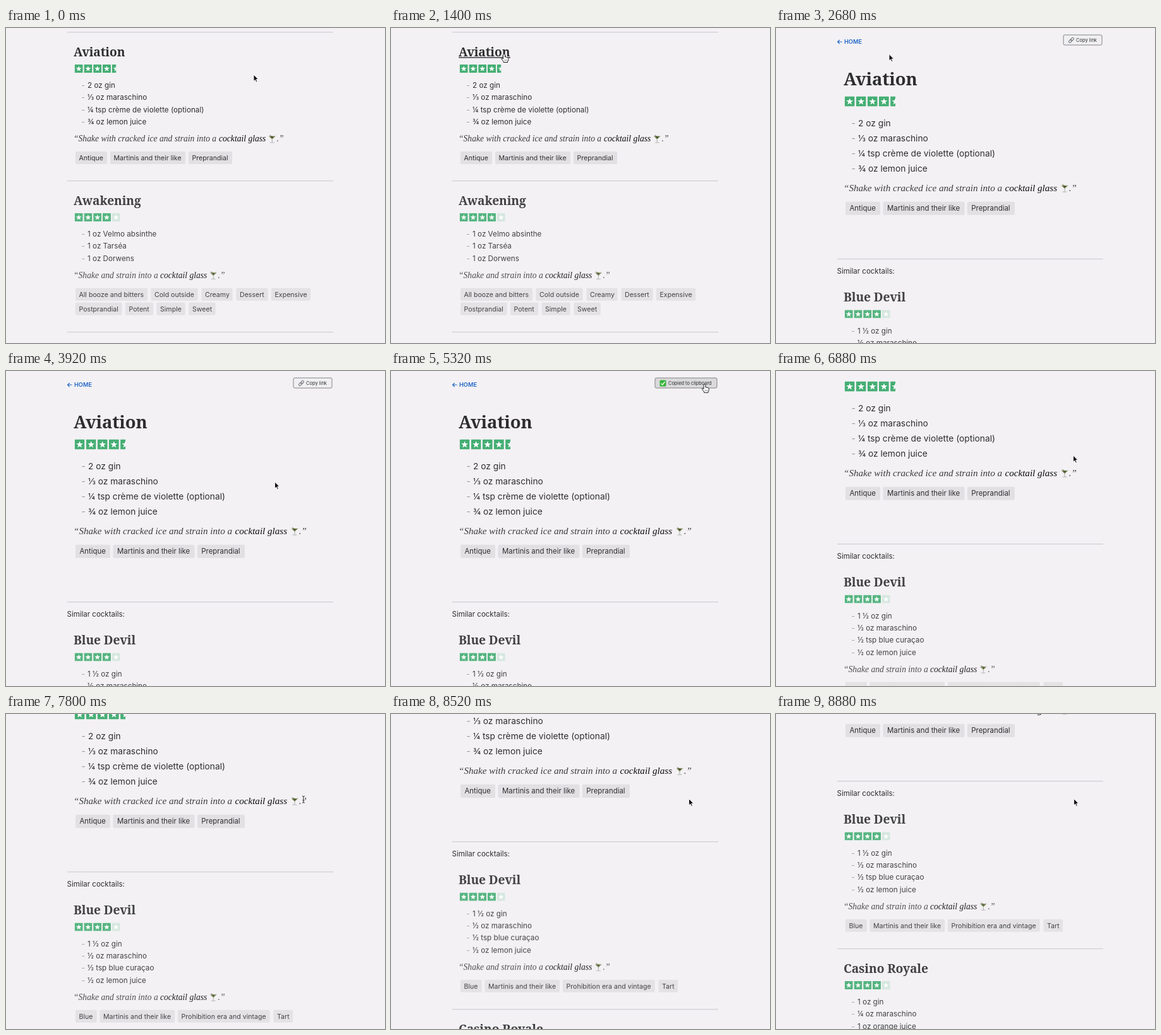
Write an HTML page that moves like this. It is 600 by 500 pixels and loops after 8920 ms.

```html
<!DOCTYPE html>
<html lang="en">
<head>
<meta charset="utf-8">
<title>Cocktail recipes</title>
<style>
  html, body { margin: 0; width: 100%; height: 100%; overflow: hidden; background: #f3f1f4; }
  #stage { display: block; width: 600px; height: 500px; }
  text { font-family: Inter, "Noto Sans", sans-serif; fill: #2e2e30; }
  .title { font-family: "Noto Serif", serif; font-weight: 700; letter-spacing: -.006em; }
  .quote { font-family: "Liberation Serif", serif; font-style: italic; fill: #3c3c3e; }
  .strong { fill: #0c0c0c; }
  .dash { fill: #97979b; }
  .tag { fill: #e2e0e3; }
  .rule { fill: #d0cfd3; }
  .link { fill: #2166c8; font-weight: 600; }
  .secondary { opacity: .9; }
</style>
</head>
<body>
<svg id="stage" viewBox="0 0 600 500">
  <g id="listPage"></g>
  <g id="detailPage"></g>
  <g id="arrow"><path d="M0 0V10.6L2.4 8.3L4 11.9L5.8 11.1L4.2 7.6H7.5Z" fill="#111" stroke="#fff" stroke-width=".9"/></g>
  <g id="hand">
    <path d="M-1.5 1.2Q-1.4-.2 0-.2T1.4 1.2V4.6Q2.6 4 3.4 5Q4.7 4.5 5.2 5.6Q6.8 5.3 6.8 7V9.2Q6.6 10.6 5.6 11.6V13H-.8V11.8Q-2.6 9.8-4.2 7.2Q-4.4 5.8-3 6.2L-1.5 7.5Z" fill="#fff" stroke="#222" stroke-width="1"/>
    <path d="M.7 8.5V11M2.6 8.5V11M4.4 8.5V11" stroke="#555" stroke-width=".6"/>
  </g>
  <g id="ibeam" fill="none">
    <path d="M-2-5.5Q0-5.5 0-4V4Q0 5.5-2 5.5M2-5.5Q0-5.5 0-4M0 4Q0 5.5 2 5.5M-1.3 1.2H1.3" stroke="#fff" stroke-width="2.2"/>
    <path d="M-2-5.5Q0-5.5 0-4V4Q0 5.5-2 5.5M2-5.5Q0-5.5 0-4M0 4Q0 5.5 2 5.5M-1.3 1.2H1.3" stroke="#222"/>
  </g>
</svg>
<script>
const LOOP = 8920, PAGE_CHANGE = 2160, COPIED = 4960;
const $ = id => document.getElementById(id);

const text = (x, y, size, content, cls = "") =>
  `<text x="${x}" y="${y}" font-size="${size}" class="${cls}">${content}</text>`;
const box = (x, y, w, h, attrs) =>
  `<rect x="${x}" y="${y}" width="${w}" height="${h}" ${attrs}/>`;
const rule = y => box(97, y, 421, 1.3, 'class="rule"');

const starPoints = Array.from({ length: 10 }, (_, i) => {
  const r = i % 2 ? 1.9 : 4.7, a = (i / 5 - .5) * Math.PI;
  return `${(6.5 + r * Math.cos(a)).toFixed(2)},${(6.8 + r * Math.sin(a)).toFixed(2)}`;
}).join(" ");

function star(x, y, size, part, color) {
  return `<svg x="${x}" y="${y}" width="${size * part}" height="${size}" viewBox="0 0 ${13 * part} 13">
    <rect width="13" height="13" rx=".6" fill="${color}"/><polygon points="${starPoints}" fill="#fff"/></svg>`;
}

function rating(value, y, size, pitch) {
  let out = "";
  for (let i = 0; i < Math.ceil(value); i++)
    out += star(108.7 + i * pitch, y, size, Math.min(1, value - i), "#45ae74");
  if (value === 4) out += star(108.7 + 4 * pitch, y, size, 1, "#d3e6dd");
  return out;
}

const glass = (x, y) => `<g transform="translate(${x} ${y})">
  <path d="M0-9.5H13L6.5-3.2Z" fill="#d9dad4"/><path d="M1.6-8.6H11.4L6.5-4Z" fill="#6d7642"/>
  <path d="M3-10.3L7-7" stroke="#594a2c"/><circle cx="6.6" cy="-7" r="1.4" fill="#3f5a2b"/>
  <path d="M6.5-4V1" stroke="#a9aaa9"/><path d="M3 1.4H10" stroke="#bcbdbc" stroke-width="1.2"/></g>`;

// Sizes and offsets of a recipe card; "large" is the main card of the detail page.
const small = { title: 19.2, stars: 13, starPitch: 14.75, starsY: 13.4, itemsY: 50.4, pitch: 19.3, item: 11.7, itemX: 129,
  quoteGap: 27.5, quote: 13.6, glassDx: 77.8, endDx: 91.5, tagGap: 29.5, tag: 10.6, tagH: 20, tagPad: 5.6 };
const large = { title: 27.5, stars: 15.8, starPitch: 18.1, starsY: 17.8, itemsY: 64.7, pitch: 24.1, item: 13.75, itemX: 130,
  quoteGap: 31, quote: 15.1, glassDx: 88, endDx: 101.2, tagGap: 31.5, tag: 11.4, tagH: 21.2, tagPad: 6.5 };

function card(recipe, y, s, cls = "") {
  const lastItem = y + s.itemsY + (recipe.items.length - 1) * s.pitch;
  const quoteY = lastItem + s.quoteGap;
  let out = text(107, y, s.title, recipe.name, "title") + rating(recipe.stars, y + s.starsY, s.stars, s.starPitch);
  recipe.items.forEach((item, i) => {
    const itemY = y + s.itemsY + i * s.pitch;
    out += text(119.5, itemY, s.item, "-", "dash") + text(s.itemX, itemY, s.item, item);
  });
  if (recipe.quote) {
    const [opening, strongX] = recipe.quote;
    out += text(107, quoteY, s.quote, "“" + opening, "quote") + text(strongX, quoteY, s.quote, "cocktail glass", "quote strong")
      + glass(strongX + s.glassDx, quoteY) + text(strongX + s.endDx, quoteY, s.quote, ".”", "quote");
    recipe.tags.forEach((row, i) => row.forEach(([label, left, right]) => {
      const tagY = quoteY + s.tagGap + i * 23;
      out += box(left - s.tagPad, tagY - s.tagH * .69, right - left + 2 * s.tagPad, s.tagH, 'rx="2" class="tag"')
        + text(left, tagY, s.tag, label);
    }));
  }
  return `<g class="${cls}">${out}</g>`;
}

const aviation = {
  name: "Aviation", stars: 4.5,
  items: ["2 oz gin", "⅓ oz maraschino", "¼ tsp crème de violette (optional)", "¾ oz lemon juice"],
  quote: ["Shake with cracked ice and strain into a", 337],
  tags: [[["Antique", 115.5, 154.5], ["Martinis and their like", 170.5, 278.5], ["Preprandial", 294.5, 352.5]]]
};
const aviationLarge = {
  ...aviation, quote: [aviation.quote[0], 362.5],
  tags: [[["Antique", 116.5, 158.5], ["Martinis and their like", 176, 292], ["Preprandial", 309.3, 371.5]]]
};
const awakening = {
  name: "Awakening", stars: 4,
  items: ["1 oz Velmo absinthe", "1 oz Tarséa", "1 oz Dorwens"],
  quote: ["Shake and strain into a", 244],
  tags: [
    [["All booze and bitters", 115.5, 218.5], ["Cold outside", 235, 298], ["Creamy", 315, 353], ["Dessert", 370, 409], ["Expensive", 425.5, 476.5]],
    [["Postprandial", 115.5, 178], ["Potent", 194.5, 227.5], ["Simple", 244, 278], ["Sweet", 295, 326]]
  ]
};
const blueDevil = {
  name: "Blue Devil", stars: 4,
  items: ["1 ½ oz gin", "½ oz maraschino", "½ tsp blue curaçao", "½ oz lemon juice"],
  quote: ["Shake and strain into a", 244],
  tags: [[["Blue", 115.5, 138], ["Martinis and their like", 154, 261.5], ["Prohibition era and vintage", 277.5, 412], ["Tart", 429, 448.5]]]
};
const casinoRoyale = { name: "Casino Royale", stars: 4, items: ["1 oz gin", "¼ oz maraschino", "1 oz orange juice"] };

$("listPage").innerHTML = rule(6) + card(aviation, 44.6, small)
  + box(107, 46.2, 82, 1.4, 'id="underline" fill="#2e2e30"')
  + rule(242) + card(awakening, 280.6, small, "secondary") + rule(482);

$("detailPage").innerHTML = `
  <path d="M104.5 22H97.8M100.6 19L97.6 22L100.6 25" fill="none" stroke="#2166c8" stroke-width="1.2"/>
  ${text(108, 25.4, 9.2, "HOME", "link")}
  <rect id="button" y="11" height="16" rx="2" stroke="#77777a" stroke-width=".9"/>
  <g id="copyLabel">
    <g fill="none" stroke="#77787c" stroke-width="1.1" transform="rotate(-45 467.5 19.3)">
      <rect x="462.5" y="17.6" width="5.6" height="3.4" rx="1.7"/><rect x="466.8" y="17.6" width="5.6" height="3.4" rx="1.7"/>
    </g>${text(475, 22.2, 7.5, "Copy link")}
  </g>
  <g id="copiedLabel">
    <rect x="425.5" y="14.5" width="10" height="10" rx="1.5" fill="#35b53a"/>
    <path d="M427.6 19.6L429.8 22L433.6 16.8" fill="none" stroke="#fff" stroke-width="1.4"/>
    ${text(439, 22.2, 7.4, "Copied to clipboard")}
  </g>`
  + card(aviationLarge, 90.8, large) + rule(366) + text(96.5, 389.5, 11.5, "Similar cocktails:")
  + card(blueDevil, 434.2, small, "secondary") + rule(632) + card(casinoRoyale, 670.5, small, "secondary");

// Keys are [time, value, ...]; values ease between neighbouring keys.
function track(keys, t) {
  const next = keys.findIndex(k => k[0] > t);
  if (next < 0) return keys.at(-1).slice(1);
  if (next === 0) return keys[0].slice(1);
  const a = keys[next - 1], b = keys[next];
  const u = (t - a[0]) / (b[0] - a[0]), eased = u * u * (3 - 2 * u);
  return a.slice(1).map((v, i) => v + (b[i + 1] - v) * eased);
}

const cursorKeys = [[40, 392, 74], [720, 179, 41.5], [2920, 179, 41.5], [3720, 425.5, 176], [3920, 425.5, 176],
  [4640, 496.5, 21.3], [5760, 496.5, 21.3], [6200, 470.5, 134], [7600, 470.5, 134], [8040, 471.5, 134.5]];
const scrollKeys = [[6240, 0], [6640, 92], [7560, 92], [7760, 116], [8320, 116], [8840, 260]];

const show = (id, visible) => $(id).setAttribute("visibility", visible ? "inherit" : "hidden");

function draw(now) {
  const t = now % LOOP;
  const [x, y] = track(cursorKeys, t), [scroll] = track(scrollKeys, t);
  const onList = t < PAGE_CHANGE, copied = t >= COPIED;
  const overTitle = onList && x < 190 && y < 50;
  const buttonX = copied ? 418 : 455;
  const overButton = !onList && x > buttonX && x < 516 && y < 28 && scroll === 0;

  show("listPage", onList);
  show("detailPage", !onList);
  show("underline", overTitle);
  show("copyLabel", !copied);
  show("copiedLabel", copied);
  $("detailPage").setAttribute("transform", `translate(0 ${-scroll})`);
  $("button").setAttribute("x", buttonX);
  $("button").setAttribute("width", 516 - buttonX);
  $("button").setAttribute("fill", overButton ? "#dad9dc" : "#f0eff2");

  const overQuote = scroll > 108 && scroll < 124;
  const pointer = overTitle || overButton ? "hand" : overQuote ? "ibeam" : "arrow";
  for (const id of ["arrow", "hand", "ibeam"]) {
    show(id, id === pointer);
    $(id).setAttribute("transform", `translate(${x} ${y + (id === "ibeam" ? 1.5 : 0)})`);
  }
  requestAnimationFrame(() => draw(performance.now()));
}
draw(0);
</script>
</body>
</html>
```
